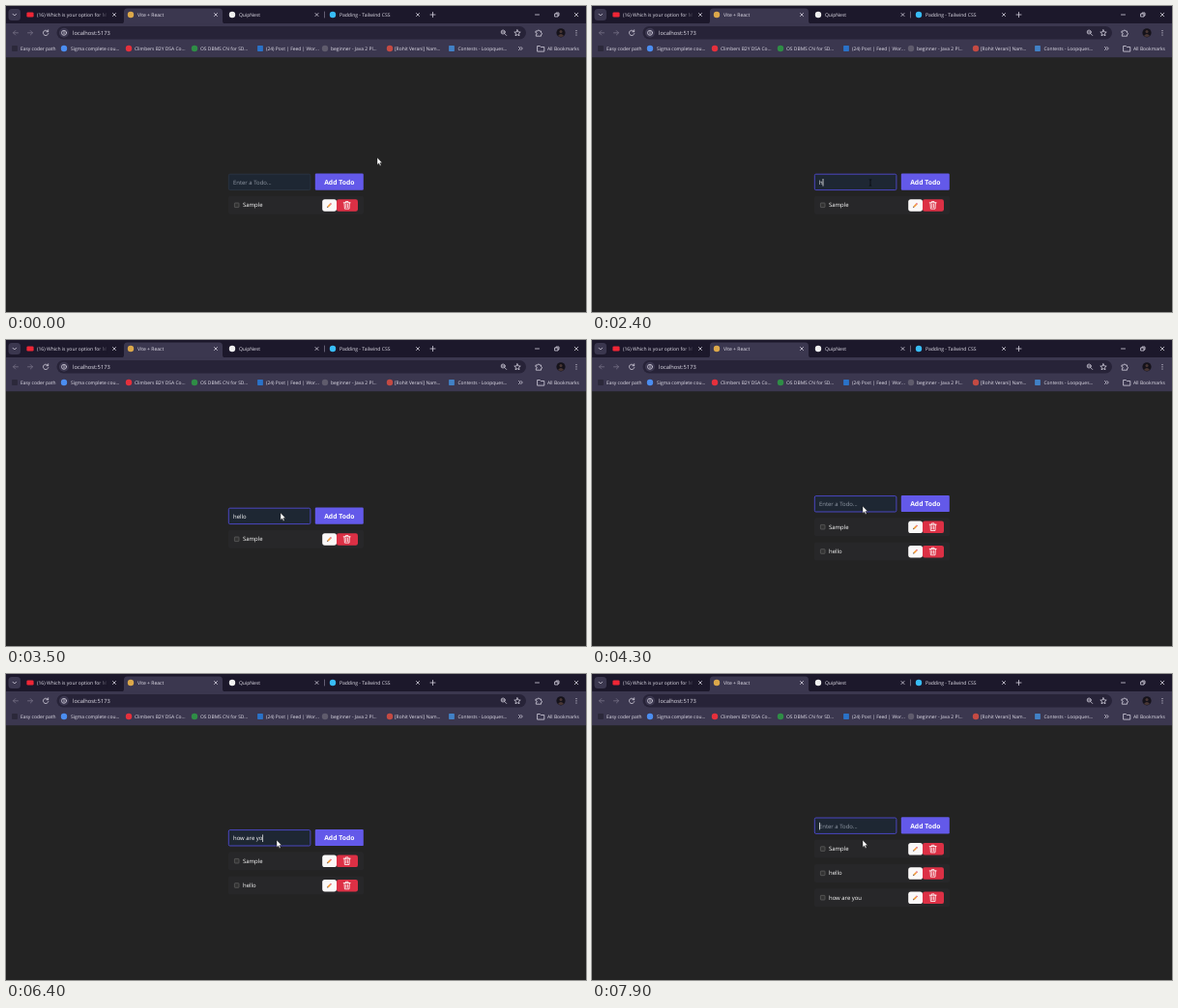
Recreate the animation shown at these times as an HTML page. Size 600 by 317 pixels, loop 8 s.

```html
<!DOCTYPE html>
<html lang="en">
<head>
<meta charset="utf-8">
<title>Todo app</title>
<style>
html, body { margin: 0; width: 100%; height: 100%; overflow: hidden; background: #232323; }
svg { display: block; width: 100vw; height: 100vh; }
text { font-family: "Open Sans", "Noto Sans", sans-serif; font-size: 5.05px; fill: #e4e1ec;
  white-space: pre; text-rendering: geometricPrecision; }
.line { fill: none; stroke: #d5d1df; stroke-width: .8; stroke-linecap: round; stroke-linejoin: round; }
.dim { stroke: #777287; }
.body { font-size: 5.95px; font-weight: 500; fill: #fff; }
.add { font-size: 6.8px; font-weight: 700; fill: #fff; text-anchor: middle; }
</style>
</head>
<body>
<svg id="stage" viewBox="0 0 600 317" preserveAspectRatio="none">
  <defs>
    <linearGradient id="fade">
      <stop offset="0" stop-color="#1c182b" stop-opacity="0"/>
      <stop offset="1" stop-color="#1c182b"/>
    </linearGradient>
  </defs>
  <rect width="600" height="317" fill="#232323"/>
  <g id="browser"></g>
  <g id="app">
    <rect id="field" x="230.3" y="174.2" width="84.6" height="16.4" rx="1.4" fill="#1e2733"/>
    <text id="value" class="body" x="235" y="184.9"></text>
    <rect id="caret" y="179" width=".7" height="7.6" fill="#fff"/>
    <rect x="319.8" y="173.5" width="50" height="17.2" rx="1.2" fill="#6359e9"/>
    <text class="add" x="344.8" y="184.9">Add Todo</text>
    <g id="rows"></g>
  </g>
  <path id="arrow" d="M0 0V7.4L1.7 5.9L2.9 8.5L4.1 8L2.9 5.4H5.2Z" fill="#fff" stroke="#111" stroke-width=".4"/>
  <path id="beam" d="M-1.2-3.3Q0-3.3 0-2.6Q0-3.3 1.2-3.3M0-2.6V2.6M-1.2 3.3Q0 3.3 0 2.6Q0 3.3 1.2 3.3" fill="none" stroke="#070a0e" stroke-width=".8"/>
</svg>
<script>
const LOOP = 8000;
const $ = id => document.getElementById(id);

const label = (x, y, s, extra = '') => `<text x="${x}" y="${y}" ${extra}>${s}</text>`;
const rect = (x, y, w, h, r, fill) =>
  `<rect x="${x}" y="${y}" width="${w}" height="${h}" rx="${r}" fill="${fill}"/>`;
const dot = (x, y, r, fill) => `<circle cx="${x}" cy="${y}" r="${r}" fill="${fill}"/>`;
const line = (d, cls = '') => `<path class="line ${cls}" d="${d}"/>`;
const ring = (x, y, r) => `<circle class="line" cx="${x}" cy="${y}" r="${r}"/>`;
const cross = (x, r) => line(`M${x - r} ${9 - r}l${2 * r} ${2 * r}m0 ${-2 * r}l${-2 * r} ${2 * r}`);

function browser() {
  const strip = '#1c182b', bar = '#3b374f', omnibox = '#272338';
  const tabs = [
    [25, '#ef2636', '(16) Which is your option for M', 112],
    [129, '#dca84a', 'Vite + React', 217],
    [234, '#f0f0f0', 'QuipNest', 321.5],
    [338, '#38bdf8', 'Padding - Tailwind CSS', 426]
  ];
  const marks = [
    [9, 15, '#2c293a', 'Easy coder path'],
    [60, 67, '#4b8df0', 'Sigma complete cou...'],
    [127, 133, '#e5303c', 'Climbers B2Y DSA Co...'],
    [195, 201, '#2f8d46', 'OS DBMS CN for SD...'],
    [263, 269, '#2a72c8', '(24) Post | Feed | Wor...'],
    [330, 336, '#5f5b6c', 'beginner - Java 2 Pl...'],
    [397, 402, '#c44a43', '[Rohit Verani] Nam...'],
    [461, 467.5, '#4181c6', 'Contests - Loopques...']
  ];
  let s = rect(0, 0, 600, 18.5, 0, strip) + rect(0, 18, 600, 35.2, 0, bar) +
    `<path d="M119 18.5q3 0 3-3V6q0-3.5 3.5-3.5h95q3.5 0 3.5 3.5v9.5q0 3 3 3z" fill="${bar}"/>` +
    rect(2.5, 3, 12.5, 12, 3.5, '#3b374f') + line('M7 8.2l1.8 1.8l1.8-1.8');

  tabs.forEach(([x, color, name, close], i) => {
    s += i ? dot(x, 9, 3.2, color) : rect(x - 3.6, 6.4, 7.2, 5.2, 1.3, color);
    s += label(x + 6.9, 10.9, name);
    if (!i) s += rect(95, 4, 10, 11, 0, 'url(#fade)') + rect(104.9, 4, 14, 11, 0, strip);
    s += cross(close, 1.5);
  });
  s += line('M329.5 6v6', 'dim') + line('M439 9h5M441.5 6.5v5') +
    line('M547.5 9h4') + line('M568 8h3v3h-3zM569 8v-1h3v3h-1') + cross(590, 1.8);

  // Toolbar
  s += line('M12.5 27.8h-5m2.2-2.2l-2.2 2.2l2.2 2.2M22.5 27.8h5m-2.2-2.2l2.2 2.2l-2.2 2.2', 'dim') +
    line('M43.4 26.3a2.7 2.7 0 1 0 .4 2.3M43.7 24.8v1.9h-1.9') +
    rect(52.5, 21, 485.5, 13.4, 6.7, omnibox) + dot(60, 27.8, 5, '#3b374f') +
    ring(60, 27.8, 2.5) + line('M60 27.5v1.4M60 26.4v.1') +
    label(69, 29.9, 'localhost:5173', 'style="font-size:5.75px"') +
    ring(514.2, 27, 2) + line('M515.7 28.5l2 2M513.4 27h1.6') +
    line('M529 24.8l.9 2.1l2.3.2l-1.7 1.5l.5 2.2l-2-1.2l-2 1.2l.5-2.2l-1.7-1.5l2.3-.2z') +
    line('M548.3 26h1.6a1 1 0 0 1 2 0h1.6v1.7a1 1 0 0 1 0 2v1.5h-5.2v-1.5a1 1 0 0 0 0-2z') +
    dot(574, 27.8, 4.6, '#15121a') + dot(574, 26.6, 1.5, '#493734') +
    '<path d="M571 30.9q3-4 6 0q-3 2.2-6 0" fill="#493734"/>' +
    [25.6, 27.8, 30].map(y => dot(590, y, .6, '#dedbe7')).join('');

  // Bookmarks
  marks.forEach(([x, tx, color, name], i) => {
    s += i === 0 || i === 4 || i === 7 ? rect(x - 2.9, 41.1, 5.8, 5.8, .6, color) : dot(x, 44, 3.2, color);
    s += label(tx, 45.8, name, 'style="font-size:4.95px"');
  });
  s += line('M530.5 42.4l1.6 1.6l-1.6 1.6m2.2-3.2l1.6 1.6l-1.6 1.6') +
    line('M550 41.5h2.4l.9 1h3.5v4.6h-6.8z') + label(560, 45.8, 'All Bookmarks', 'style="font-size:4.95px"');
  return s;
}

function row(name, i) {
  return `<g transform="translate(0 ${i * 25.3 - .2})">` +
    rect(230, 197, 140, 19, 2, '#272729') +
    '<rect x="236.4" y="204.2" width="4.6" height="4.6" rx=".6" fill="#333" stroke="#6c6c6c" stroke-width=".6"/>' +
    label(245, 208.6, name, 'class="body"') +
    rect(342, 200.4, 22, 12.5, 2.2, '#dc3045') + rect(327.2, 200.4, 14.8, 12.5, 2.6, '#faf8f8') +
    '<g transform="translate(334.5 206.7) rotate(-45)">' +
    rect(-2.1, -.8, 3.6, 1.6, 0, '#f29a37') + rect(1.5, -.8, 1.3, 1.6, .4, '#e3526b') +
    '<path d="M-2.1-.8L-3.4 0L-2.1.8z" fill="#59413a"/></g>' +
    '<path class="line" style="stroke:#fff" d="M349.2 204h7M351.4 204v-1.3h2.6v1.3M350 204l.4 6.3h4.6l.4-6.3M351.8 205.6v3.2M353.6 205.6v3.2"/></g>';
}

// Each table holds [start ms, value...] and keeps a value until the next start.
const pointer = [
  [0, 384, 157], [100, 376, 157.5], [200, 360, 159], [300, 342, 161], [400, 327, 163],
  [600, 315, 164.5], [700, 304, 166], [1100, 302, 166], [1600, 301, 166], [1700, 296, 171],
  [1800, 291, 179], [1900, 288, 183], [3100, 286, 181], [3200, 284, 179],
  [3600, 281, 174], [3700, 280, 172]
];
const typed = [
  [0, ''], [2400, 'h'], [2500, 'he'], [2700, 'hel'], [2800, 'hell'], [3000, 'hello'], [3700, ''],
  [5300, 'h'], [5400, 'ho'], [5500, 'how'], [5600, 'how '], [5800, 'how a'], [5900, 'how ar'],
  [6000, 'how are'], [6100, 'how are '], [6300, 'how are y'], [6400, 'how are yo'],
  [6600, 'how are you'], [7400, '']
];
const blink = [
  [0, 0], [2200, 1], [3500, 0], [4000, 1], [4300, 0], [4800, 1],
  [6900, 0], [7200, 1], [7400, 0], [7800, 1]
];
const added = [[0, 1], [3700, 2], [7400, 3]];
const at = (table, t) => table.findLast(step => step[0] <= t);

const items = ['Sample', 'hello', 'how are you'];
$('browser').innerHTML = browser();
$('rows').innerHTML = items.map(row).join('');
const rows = [...$('rows').children];

function draw(t) {
  const [, x, y] = at(pointer, t);
  const text = at(typed, t)[1];
  const count = at(added, t)[1];
  const focus = t >= 2200;
  const overText = t >= 1800 && t < 3200;

  $('app').setAttribute('transform', `translate(0 ${-12.6 * (count - 1)})`);
  rows.forEach((r, i) => r.style.display = i < count ? '' : 'none');

  $('field').setAttribute('stroke', focus ? '#504bd2' : '#2f3d50');
  $('field').setAttribute('stroke-width', focus ? .9 : .6);
  const value = $('value');
  value.textContent = text || 'Enter a Todo...';
  value.style.fill = text ? '#fff' : '#929aa6';
  value.style.fontWeight = text ? 500 : 400;
  $('caret').setAttribute('x', 235 + (text ? value.getComputedTextLength() : 0));
  $('caret').style.display = at(blink, t)[1] ? '' : 'none';

  for (const id of ['arrow', 'beam']) {
    $(id).setAttribute('transform', `translate(${x} ${y})`);
    $(id).style.display = (id === 'beam') === overText ? '' : 'none';
  }
}

const start = performance.now();
function tick() {
  draw((performance.now() - start) % LOOP);
  requestAnimationFrame(tick);
}
tick();
</script>
</body>
</html>
```
